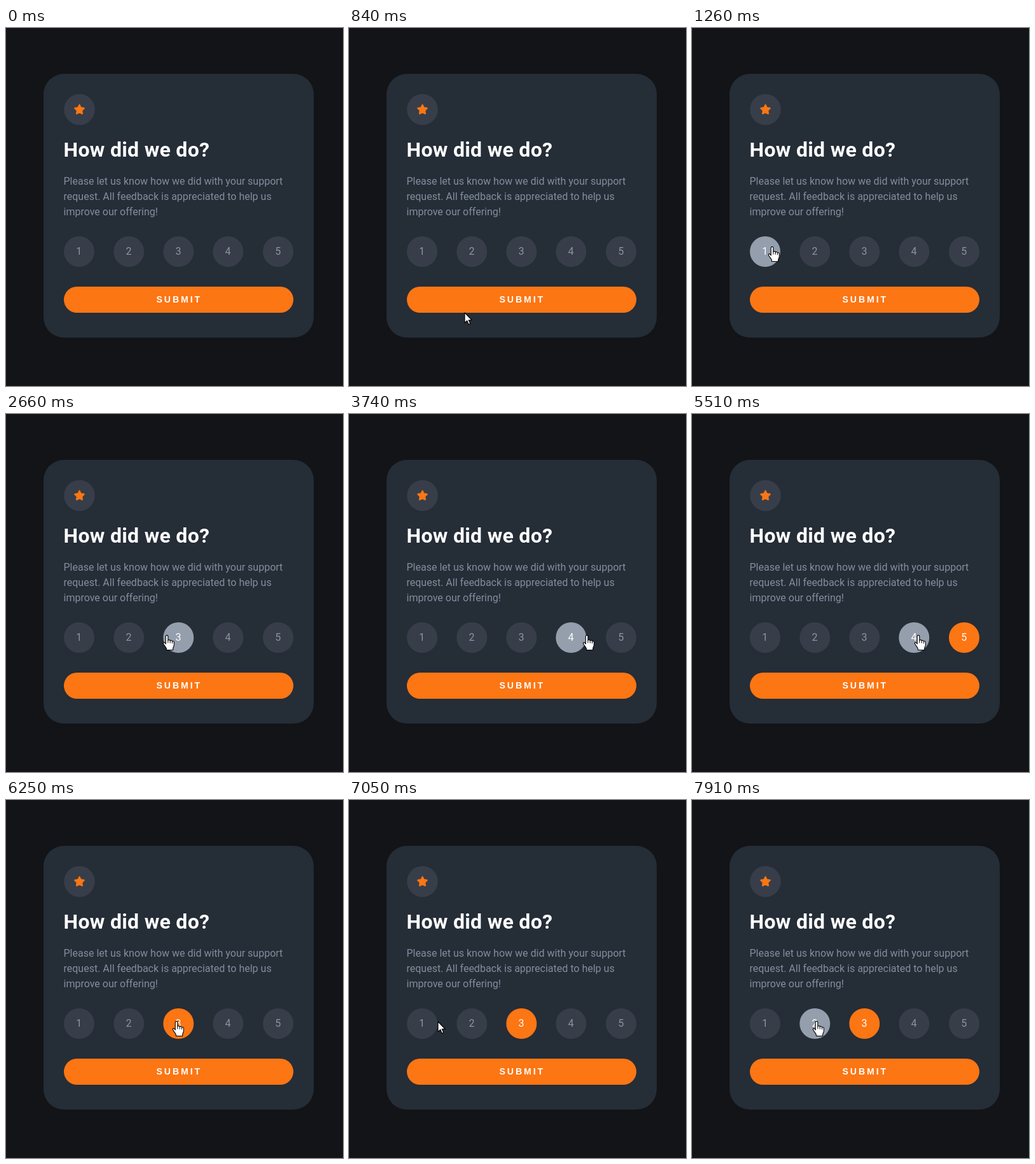
These frames come from a looping animation (530x562 px, 8000 ms). An HTML page:

```html
<!DOCTYPE html>
<html lang="en">
<head>
<meta charset="utf-8">
<title>Rating card</title>
<style>
  html, body { margin: 0; width: 100%; height: 100%; overflow: hidden; background: #121417; }
  svg { display: block; width: 530px; height: 562px; font-family: Roboto, "Open Sans", sans-serif; }
  .card { fill: #252d37; }
  .title { font-size: 32px; font-weight: 700; letter-spacing: .3px; fill: #fff; }
  .copy { font-size: 16px; fill: #828d9e; }
  .disc, .rate circle { fill: #373e49; }
  .star { fill: #fc7614; stroke: #fc7614; stroke-width: 2; stroke-linejoin: round; }
  .rate text { font-size: 16px; text-anchor: middle; fill: #8a95a4; }
  .rate.hover circle { fill: #959eac; }
  .rate.on circle { fill: #fc7614; }
  .rate.hover text, .rate.on text { fill: #fff; }
  .button { fill: #fc7614; }
  .label { font: 700 14px "Liberation Sans", Arial, sans-serif; letter-spacing: 3px; fill: #fff; }
  #click { fill: #ff0; opacity: .5; }
  #cursor path { fill: #fff; stroke: #000; stroke-width: 1.1; stroke-linejoin: round; }
  #hand .gap { fill: none; stroke-width: 1; }
</style>
</head>
<body>
<svg viewBox="0 0 530 562">
  <rect class="card" x="59" y="72" width="425" height="414" rx="32"/>
  <circle class="disc" cx="115.5" cy="128" r="24.3"/>
  <polygon class="star" transform="translate(115.5 128.3) scale(1.08)"
    points="0,-7 2.1,-2.9 6.7,-2.2 3.4,1.1 4.1,5.7 0,3.6 -4.1,5.7 -3.4,1.1 -6.7,-2.2 -2.1,-2.9"/>
  <text class="title" x="90.5" y="202">How did we do?</text>
  <g class="copy">
    <text x="90.5" y="246">Please let us know how we did with your support</text>
    <text x="90.5" y="270">request. All feedback is appreciated to help us</text>
    <text x="90.5" y="294">improve our offering!</text>
  </g>
  <g id="rates"></g>
  <rect class="button" x="91" y="406" width="361" height="41" rx="20.5"/>
  <text class="label" x="236.5" y="431">SUBMIT</text>
  <circle id="click" cy="348" r="12"/>
  <g id="cursor">
    <g id="hand" transform="translate(1 0)">
      <path d="M-1.8 1.2a1.8 1.8 0 0 1 3.6 0V7.2C2.4 6.2 5 6.4 5.2 8C6 7 8.3 7.3 8.4 8.9C9.2 8.2 11.3 8.6 11.3 10.5V14.5C11.3 17 9.6 18 9.6 20.5V22.5H-.6V20.8C-.6 19-4 15.8-5.6 12.6C-6.3 11-4.4 9.9-3.2 11.2L-1.8 13Z"/>
      <path class="gap" d="M1.8 7V11.5M5.2 8V11.8M8.4 9V12.3"/>
    </g>
    <path id="arrow" d="M0 0V16L3.7 12.5L6.2 18.3L8.7 17.2L6.2 11.5H11.2Z"/>
  </g>
</svg>
<script>
  const LOOP = 8000;
  const $ = id => document.getElementById(id);
  const centers = [115, 193.25, 271.25, 349.25, 428];
  const rowY = 351;

  $("rates").innerHTML = centers.map((x, i) =>
    `<g class="rate"><circle cx="${x}" cy="${rowY}" r="24"/><text x="${x - .3}" y="355.5">${i + 1}</text></g>`
  ).join("");
  const rates = [...document.querySelectorAll(".rate")];

  const linear = p => p;
  const easeOut = p => 1 - (1 - p) ** 1.26;
  const easeInOut = p => (1 - Math.cos(Math.PI * p)) / 2;

  // Each move: start, end, number of steps, destination, easing
  const start = [262, 590];
  const moves = [
    [500, 1260, 12, [125, 344], easeOut],
    [1720, 2460, 11, [214, 348], easeInOut],
    [2530, 3280, 12, [339, 348], easeOut],
    [3350, 3410, 2, [346, 348], linear],
    [3610, 4080, 8, [417, 348], linear],
    [5300, 5850, 9, [267, 348], easeInOut],
    [6720, 7190, 8, [118, 348], easeInOut],
    [7720, 7910, 4, [195, 348], linear]
  ];
  // Each click: press time, release time, x, rating index
  const clicks = [[4630, 4770, 417, 4], [6180, 6250, 267, 2]];

  function cursorAt(t) {
    let pos = start;
    for (const [from, to, steps, dest, ease] of moves) {
      if (t < from) break;
      const step = Math.floor((t - from) / (to - from) * (steps - 1) + .1) + 1;
      const p = ease(Math.min(1, step / steps));
      pos = pos.map((v, i) => v + (dest[i] - v) * p);
    }
    return pos.map(Math.round);
  }

  const show = (el, visible) => el.setAttribute("visibility", visible ? "visible" : "hidden");

  function draw(t) {
    const [x, y] = cursorAt(t);
    const hovered = centers.findIndex(c => Math.hypot(x - c, y - rowY) <= 24.5);
    const onButton = x > 91 && x < 452 && y > 406 && y < 447;
    const pointing = hovered >= 0 || onButton;

    let selected = -1;
    for (const [, up, , index] of clicks) if (t >= up) selected = index;
    rates.forEach((el, i) => {
      el.classList.toggle("hover", i === hovered);
      el.classList.toggle("on", i === selected);
    });

    const press = clicks.find(([down, up]) => t >= down && t < up);
    show($("click"), press);
    if (press) $("click").setAttribute("cx", press[2]);

    $("cursor").setAttribute("transform", `translate(${x} ${y})`);
    show($("hand"), t >= 500 && pointing);
    show($("arrow"), t >= 500 && !pointing);
  }

  const begin = performance.now();
  function tick() {
    draw((performance.now() - begin) % LOOP);
    requestAnimationFrame(tick);
  }
  tick();
</script>
</body>
</html>
```
